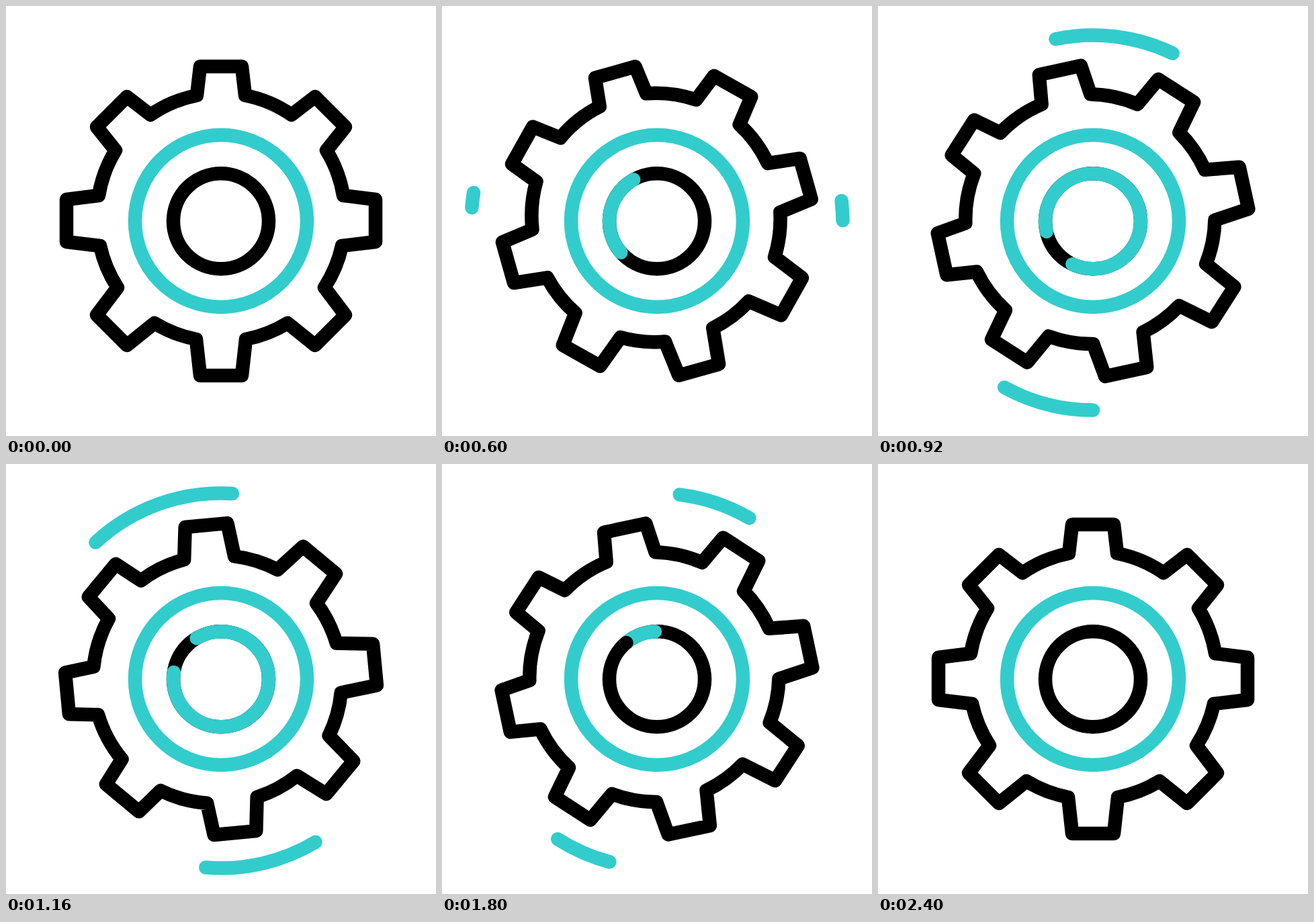
An HTML page for the animation above (2480 ms loop, 640 by 640 pixels).

```html
<!DOCTYPE html>
<html lang="en">
<head>
<meta charset="utf-8">
<title>Turning gear</title>
<style>
html, body { margin: 0; width: 100%; height: 100%; overflow: hidden; background: #fff; }
svg { display: block; width: 100vw; height: 100vh; }
.line { fill: none; stroke-width: 20.5; stroke-linecap: round; stroke-linejoin: round; }
.dark { stroke: #000; }
.teal { stroke: #33cccc; }
</style>
</head>
<body>
<svg viewBox="0 0 640 640">
  <path id="gear" class="line dark"/>
  <circle class="line teal" cx="320" cy="320" r="128"/>
  <circle class="line dark" cx="320" cy="320.3" r="71"/>
  <path id="sweep" class="line teal"/>
  <circle id="tip" r="10.25"/>
  <path id="top" class="line teal"/>
  <path id="bottom" class="line teal"/>
</svg>
<script>
const LOOP = 2480, STEP = 40, LAST = 2400;
const el = id => document.getElementById(id);

// Right half of the outline, top to bottom; each arc joins two teeth.
const half = [
  [351, 90], [356, 133], [425, 162], [460, 135], [505, 180], [477, 215], [502, 282], [550, 288],
  [550, 351], [500, 357], [474, 419], [505, 460], [460, 505], [419, 472], [357, 496], [351, 550]
];

function gearPath() {
  const mirrored = half.map(([x, y]) => [640 - x, y]).reverse();
  return [...half, ...mirrored].map(([x, y], i) => {
    const cmd = i === 0 ? 'M' : i % 4 === 2 && i < 16 || i % 4 === 2 ? 'A185.5 185.5 0 0 1 ' : 'L';
    return cmd + x + ' ' + y;
  }).join('') + 'Z';
}

// Smooth curve through [time, value] keys, without overshoot.
function curve(keys, restful = false) {
  const n = keys.length - 1;
  const d = [], h = [], m = [];
  for (let i = 0; i < n; i++) {
    h[i] = keys[i + 1][0] - keys[i][0];
    d[i] = (keys[i + 1][1] - keys[i][1]) / h[i];
  }
  m[0] = restful ? 0 : d[0];
  m[n] = restful ? 0 : d[n - 1];
  for (let i = 1; i < n; i++) {
    const a = d[i - 1], b = d[i];
    if (a * b <= 0) { m[i] = 0; continue; }
    const slope = (a * h[i] + b * h[i - 1]) / (h[i] + h[i - 1]);
    const limit = 3 * Math.min(Math.abs(a), Math.abs(b));
    m[i] = Math.sign(slope) * Math.min(Math.abs(slope), limit);
  }
  return t => {
    if (t <= keys[0][0]) return keys[0][1];
    if (t >= keys[n][0]) return keys[n][1];
    let i = 0;
    while (t > keys[i + 1][0]) i++;
    const u = (t - keys[i][0]) / h[i], v = 1 - u;
    return keys[i][1] * v * v * (1 + 2 * u) + m[i] * h[i] * u * v * v
      + keys[i + 1][1] * u * u * (3 - 2 * u) - m[i + 1] * h[i] * u * u * v;
  };
}

const turn = curve([[0, 0], [600, -15.7], [920, -57.35], [1330, -109.5], [1480, -103.8],
  [1800, -57], [2080, -11.1], [2400, 0]], true);

// Both tips of a swinging arc share their times.
const swing = (...v) => curve([530, 600, 920, 1315, 1480, 1800, 2030].map((t, i) => [t, v[i]]));
const topHead = swing(90, 83.3, -11.6, -47, -40.3, 7, 90);
const topTail = swing(90, 89.3, 25.4, 0, 5.8, 29.8, 90);
const lowHead = swing(280, 274.6, 180, 145, 151.5, 194.8, 280);
const lowTail = swing(280, 279.2, 208.5, 181, 187.2, 212.3, 280);

const run = (...v) => curve([440, 600, 920, 1480, 1800, 1880].map((t, i) => [t, v[i]]));
const sweepTail = run(-135, -131, -102.5, 120.6, 320, 360);
const sweepHead = run(-135, -29.4, 205.6, 308.5, 357.5, 360);

const orbit = { x: 320, y: 322.5, rx: 276.5, ry: 279 };
const hub = { x: 320, y: 320.3, rx: 71, ry: 71 };

// Angles run clockwise from the top, in degrees.
function point(e, deg) {
  const a = deg * Math.PI / 180;
  return [e.x + e.rx * Math.sin(a), e.y - e.ry * Math.cos(a)];
}

function drawArc(node, e, from, to) {
  if (to - from < 0.05) { node.setAttribute('d', ''); return; }
  const large = to - from > 180 ? 1 : 0;
  node.setAttribute('d',
    `M${point(e, from).join(' ')}A${e.rx} ${e.ry} 0 ${large} 1 ${point(e, to).join(' ')}`);
}

const gear = el('gear'), sweep = el('sweep'), tip = el('tip');
const top_ = el('top'), bottom = el('bottom');
gear.setAttribute('d', gearPath());

function draw(t) {
  gear.setAttribute('transform', `rotate(${turn(t)} 320 320)`);
  drawArc(top_, orbit, topHead(t), topTail(t));
  drawArc(bottom, orbit, lowHead(t), lowTail(t));

  const tail = sweepTail(t), head = sweepHead(t);
  drawArc(sweep, hub, tail, head);
  const [x, y] = point(hub, tail);
  tip.setAttribute('cx', x);
  tip.setAttribute('cy', y);
  tip.setAttribute('visibility', t > 1680 && t < 1880 ? 'visible' : 'hidden');
}

const start = performance.now();
function frame() {
  const t = (performance.now() - start) % LOOP;
  draw(Math.min(Math.floor(t / STEP) * STEP, LAST));
  requestAnimationFrame(frame);
}
frame();
</script>
</body>
</html>
```
